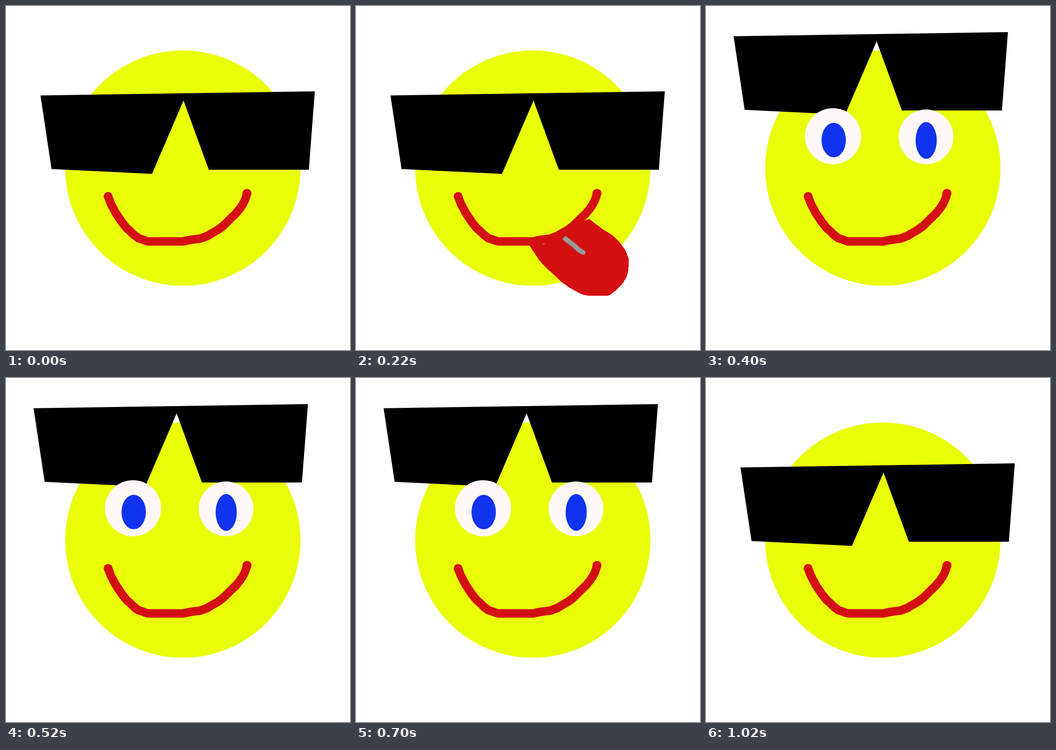
An HTML page that plays this animation: 748x748 px, repeating every 1.1 s.

```html
<!DOCTYPE html>
<html lang="en">
<head>
<meta charset="utf-8">
<title>Winking smiley</title>
<style>
  html, body { margin: 0; width: 100%; height: 100%; overflow: hidden; background: #fff; }
  svg { display: block; width: 100vw; height: 100vh; }
  .line { fill: none; stroke-linecap: round; stroke-linejoin: round; }
  .white { fill: #fff8f9; }
  .iris { fill: #1033f0; }
</style>
</head>
<body>
<svg viewBox="0 0 748 748">
  <circle cx="384.5" cy="352.5" r="255.8" fill="#e9ff08"/>

  <path id="glasses" d="M75 194.5 671.5 185.5 658.5 356H441L386 205.5 317.5 365 99 354.5Z"/>

  <g id="leftEye">
    <circle class="white" cx="276.2" cy="283.2" r="61"/>
    <ellipse class="iris" cx="277.7" cy="291.5" rx="26.5" ry="37.5"/>
  </g>
  <g id="rightEye">
    <circle class="white" cx="478.4" cy="284.6" r="59.5"/>
    <ellipse class="iris" cx="478.8" cy="292.2" rx="23" ry="40"/>
  </g>
  <path id="wink" class="line" stroke="#000" stroke-width="19" d="M426.5 275.7H545.5"/>

  <g id="tongue">
    <path fill="#d40f12" shape-rendering="crispEdges" d="M376 519 388 537 398 552 411 567 430 584 445 599
      465 613 487 625Q497 630 512 630H548Q559 625 575 609 588 594 591 580 593 572 593 550
      590 539 585 530 577 517 565 505 553 494 540 488 520 473 507 463 500 461L470 482 430 504 390 510Z"/>
    <path class="line" stroke="#b8383a" stroke-width="12" style="stroke-linecap:butt" d="M452 504 466 515 484 530 495 536"/>
    <path class="line" stroke="#999" stroke-width="10" style="stroke-linecap:butt" d="M452 503 466 514.5 475 521 484 530 494 536"/>
    <circle cx="494" cy="536" r="5" fill="#999"/>
  </g>

  <g fill="#d40f12">
    <path class="line" stroke="#d40f12" stroke-width="18.5" d="M222 414 228 430 238 449 252 470 262 482.5 270 489.5
      278 497.5 288 505 299 508.5Q306 512 312 512H385Q400 508 422 506L438 500 447 494.5
      461 486.5 473 477.5 487 463.5 500 451 509 440Q522 422 523.5 408"/>
    <circle cx="222" cy="414" r="9.6"/>
    <circle cx="524" cy="407.5" r="9.8"/>
  </g>
  <path id="gap" class="line" stroke="#eccc20" d="M405 517.5 410.5 516.5"/>
</svg>
<script>
const LOOP = 1100;
const STEPS = [
  [0, 'cool'], [100, 'tongue'], [300, 'cool'], [400, 'eyes'],
  [600, 'wink'], [700, 'eyes'], [900, 'cool']
];
const part = id => document.getElementById(id);
const show = (id, on) => part(id).setAttribute('visibility', on ? 'visible' : 'hidden');
const move = (id, x, y) => part(id).setAttribute('transform', `translate(${x} ${y})`);

function pose(name) {
  const wink = name === 'wink';
  const raised = wink || name === 'eyes';
  const tongue = name === 'tongue';
  move('glasses', raised ? -15 : 0, raised ? -128.7 : 0);
  move('leftEye', wink ? 2 : 0, wink ? -6 : 0);
  show('leftEye', raised);
  show('rightEye', raised && !wink);
  show('wink', wink);
  show('tongue', tongue);
  show('gap', tongue);
}

function draw() {
  const time = performance.now() % LOOP;
  pose(STEPS.findLast(([start]) => start <= time)[1]);
  requestAnimationFrame(draw);
}
draw();
</script>
</body>
</html>
```
